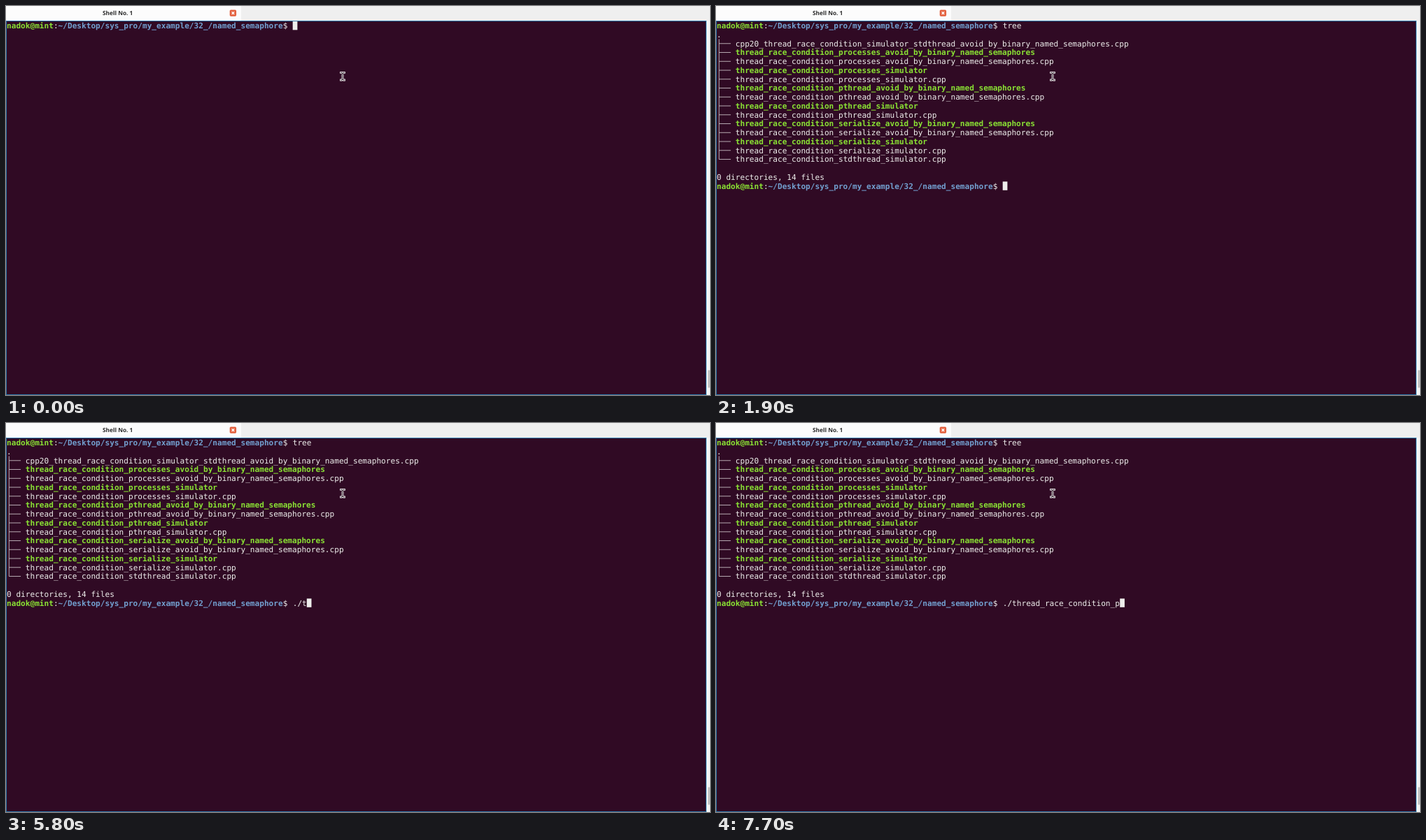
Recreate the animation shown at these times as an HTML page. Size 1006 by 557 pixels, loop 8 s.

```html
<!DOCTYPE html>
<html lang="en">
<head>
<meta charset="utf-8">
<title>Terminal</title>
<style>
  html, body { margin: 0; width: 100%; height: 100%; overflow: hidden; background: #300a24; }
  svg { display: block; width: 1006px; height: 557px; }
  text { white-space: pre; text-rendering: geometricPrecision; }
  .term text { font: 11.129px "DejaVu Sans Mono", monospace; fill: #eeeeec; }
  .term .exe, .term .user { font-weight: 700; fill: #8ae234; }
  .term .path { font-weight: 700; fill: #729fcf; }
  .tab { font: 700 8.3px "Open Sans", sans-serif; fill: #2b2b2b; text-anchor: middle; }
  .branch { fill: none; stroke: #d8d3d6; stroke-width: .8; }
  .beam { fill: none; stroke-linecap: square; }
</style>
</head>
<body>
<svg viewBox="0 0 1006 557">
  <rect width="1006" height="557" fill="#efefef"/>
  <rect width="336" height="21" fill="#fcfcfc"/>
  <text class="tab" x="159.7" y="13.2">Shell No. 1</text>
  <rect x="319.7" y="5.5" width="9.4" height="9.2" rx="1.6" fill="#e4613f"/>
  <path d="M322.6 8.3l3.6 3.6m0-3.6l-3.6 3.6" stroke="#fff" stroke-width="1.4"/>

  <rect x="1001" y="21" width="5" height="536" fill="#f5f5f5"/>
  <rect x="1003" y="521.5" width="3" height="25" fill="#c4c4c4"/>
  <rect x=".5" y="21.5" width="1000" height="535" fill="#300a24" stroke="#2a76a8"/>

  <g class="term">
    <g id="first"></g>
    <g id="output"></g>
    <text id="typed"></text>
    <rect id="caret" width="6.7" height="12.4" fill="#eeeeec"/>
  </g>

  <defs>
    <path id="beam" d="M478.6 95.4h1.2l1.2 1 1.2-1h1.2M481 96.4v8.6M478.6 106h1.2l1.2-1 1.2 1h1.2"/>
  </defs>
  <use href="#beam" class="beam" stroke="#fff" stroke-width="2.8"/>
  <use href="#beam" class="beam" stroke="#1c0a16" stroke-width="1"/>
</svg>
<script>
  const LOOP = 8000, LEFT = 1, TOP = 21.9, CELL = 6.7, ROW = 12.75;
  const USER = 'nadok@mint', PATH = '~/Desktop/sys_pro/my_example/32_/named_semaphore';
  const PROMPT = USER.length + PATH.length + 3;
  const COMMAND = './thread_race_condition_p';
  const LAST_ROW = 18, ENTER = 1900;

  // [time, row, typed text]
  const steps = [
    [0, 0, ''], [500, 0, 't'], [1200, 0, 'tr'], [1400, 0, 'tre'], [1700, 0, 'tree'],
    ...[[ENTER, 0], [3300, 1], [3600, 2], [5800, 3], [5900, 4], [6100, 5], [6200, 6], [6400, 24], [7700, 25]]
      .map(([time, n]) => [time, LAST_ROW, COMMAND.slice(0, n)])
  ];

  const $ = id => document.getElementById(id);
  const colX = col => LEFT + col * CELL;
  const rowY = row => TOP + row * ROW;
  const line = (row, col, content, cls = '') =>
    `<text class="${cls}" x="${colX(col)}" y="${rowY(row) + 10.2}">${content}</text>`;
  const prompt = row => line(row, 0,
    `<tspan class="user">${USER}</tspan>:<tspan class="path">${PATH}</tspan>$ `);

  function listing() {
    const avoid = '_avoid_by_binary_named_semaphores';
    const files = [`cpp20_thread_race_condition_simulator_stdthread${avoid}.cpp`];
    for (const kind of ['processes', 'pthread', 'serialize'])
      for (const tail of [avoid, '_simulator']) {
        const name = `thread_race_condition_${kind}${tail}`;
        files.push(name, name + '.cpp');
      }
    files.push('thread_race_condition_stdthread_simulator.cpp');

    const middle = i => rowY(i + 2) + ROW / 2;
    const x = colX(.5);
    let branches = `M${x} ${rowY(2)}V${middle(files.length - 1)}`;
    let rows = line(1, 0, '.');
    files.forEach((name, i) => {
      branches += `M${x} ${middle(i)}H${colX(3)}`;
      rows += line(i + 2, 4, name, name.endsWith('.cpp') ? '' : 'exe');
    });
    return line(0, PROMPT, 'tree') + rows + `<path class="branch" d="${branches}"/>` +
      line(17, 0, '0 directories, 14 files') + prompt(LAST_ROW);
  }

  function place(el, x, y) {
    el.setAttribute('x', x);
    el.setAttribute('y', y);
  }

  let shown;
  function draw(now) {
    const time = now % LOOP;
    const step = steps.findLast(s => s[0] <= time);
    if (step !== shown) {
      shown = step;
      const [start, row, text] = step;
      $('output').style.display = start < ENTER ? 'none' : '';
      $('typed').textContent = text;
      place($('typed'), colX(PROMPT), rowY(row) + 10.2);
      place($('caret'), colX(PROMPT + text.length), rowY(row));
    }
  }

  $('first').innerHTML = prompt(0);
  $('output').innerHTML = listing();

  const origin = performance.now();
  function tick() {
    draw(performance.now() - origin);
    requestAnimationFrame(tick);
  }
  tick();
</script>
</body>
</html>
```
